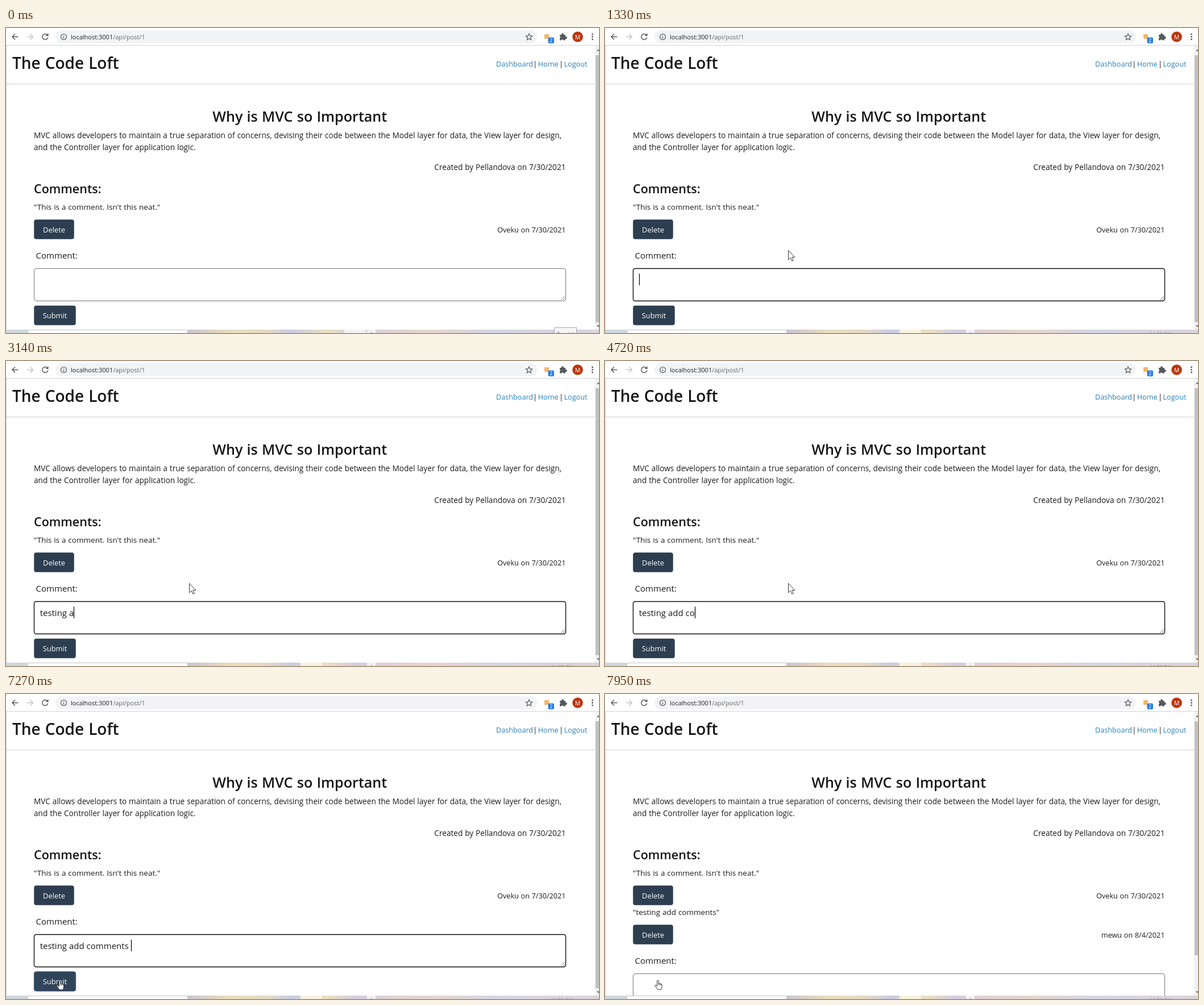
Recreate the animation shown at these times as an HTML page. Size 1043 by 537 pixels, loop 8000 ms.

```html
<!DOCTYPE html>
<html lang="en">
<head>
<meta charset="utf-8">
<title>Blog post comments</title>
<style>
  html, body { margin: 0; width: 100%; height: 100%; overflow: hidden; background: #fff; }
  svg { display: block; width: 1043px; height: 537px; }
  text { font-family: "Open Sans", "Noto Sans", sans-serif; font-size: 13.64px; word-spacing: .4px; fill: #1b1b1b; white-space: pre; }
  .head { font-weight: 600; fill: #161616; word-spacing: .7px; }
  .note { font-size: 13.5px; }
  .small { font-size: 12.65px; }
  .nav { font-size: 12.65px; }
  .link { fill: #2980b9; }
  .field { font-size: 15px; word-spacing: 0; }
  .label { font-size: 12.85px; fill: #fff; }
  .url { font-size: 11px; fill: #202124; }
  .tiny { font-size: 9px; fill: #666; }
  .end { text-anchor: end; }
  .mid { text-anchor: middle; }
  .icon { fill: none; stroke: #55595e; stroke-width: 1.5; }
  .thin { stroke-width: 1.2; }
  .ptr { fill: #fff; stroke: #222; stroke-width: .9; stroke-linejoin: round; }
</style>
</head>
<body>
<svg viewBox="0 0 1043 537">
  <defs>
    <clipPath id="view"><rect y="31" width="1043" height="500"/></clipPath>
    <linearGradient id="wall">
      <stop offset="0" stop-color="#c9c5d0"/>
      <stop offset=".1" stop-color="#eadcbc"/>
      <stop offset=".19" stop-color="#e6dac3"/>
      <stop offset=".25" stop-color="#c9cbe2"/>
      <stop offset=".34" stop-color="#ecdfbe"/>
      <stop offset=".41" stop-color="#d3cde0"/>
      <stop offset=".5" stop-color="#e3d2d2"/>
      <stop offset=".6" stop-color="#e6d6cf"/>
      <stop offset=".75" stop-color="#d4d5e3"/>
      <stop offset="1" stop-color="#dcd3da"/>
    </linearGradient>
  </defs>
  <rect width="1043" height="537" fill="#fff"/>

  <g id="page" clip-path="url(#view)">
    <path d="M0 98.5H1036" stroke="#d2d2d2"/>
    <text class="head" x="11" y="72" style="font-size:28px">The Code Loft</text>
    <text class="nav link" x="862" y="68">Dashboard</text>
    <text class="nav mid" x="930.8" y="68">|</text>
    <text class="nav link" x="935.8" y="68">Home</text>
    <text class="nav mid" x="976.5" y="68">|</text>
    <text class="nav link" x="981.5" y="68">Logout</text>

    <text class="head mid" x="516.7" y="165" style="font-size:25.1px">Why is MVC so Important</text>
    <text x="49" y="194">MVC allows developers to maintain a true separation of concerns, devising their code between the Model layer for data, the View layer for design,</text>
    <text x="49" y="215">and the Controller layer for application logic.</text>
    <text class="end" x="984.5" y="250">Created by Pellandova on 7/30/2021</text>
    <text class="head" x="49" y="291" style="font-size:21.5px">Comments:</text>

    <text class="note" x="49" y="319.5">"This is a comment. Isn't this neat."</text>
    <g id="del"></g>
    <text class="small end" x="984.5" y="360">Oveku on 7/30/2021</text>

    <g id="added">
      <text class="note" x="49" y="388.5">"testing add comments"</text>
      <g id="del2"></g>
      <text class="small end" x="984.5" y="429">mewu on 8/4/2021</text>
    </g>

    <g id="form">
      <text class="field" x="52.5" y="406">Comment:</text>
      <rect id="box" x="49.5" y="423.5" width="935" height="57" rx="3.5" fill="#fff"/>
      <path d="M976 479l7-7M980 479l3-3" stroke="#777" stroke-width=".9"/>
      <text id="typed" class="field" x="59.7" y="449"></text>
      <path id="caret" d="M.5 432.5V453" stroke="#000" stroke-width="1.2"/>
      <g id="send"></g>
    </g>
    <rect x="1036" y="31" width="7" height="500" fill="#f1f1f1"/>
    <rect id="thumb" x="1037" y="48" width="6" fill="#c1c1c1"/>
    <path d="M1039 40.5l3-3 3 3zM1039 523.5l3 3 3-3z" fill="#606060"/>
  </g>
  <path d="M0 30.5H1043M.5 30V531" stroke="#d0d2d5"/>

  <g id="toolbar">
    <rect x="87" y="4" width="847" height="23" rx="11.5" fill="#f1f3f4"/>
    <path class="icon" d="M21.5 15.5H11.5M16 10.5l-5 5 5 5"/>
    <path class="icon" d="M37 15.5H47M42.5 10.5l5 5-5 5" style="stroke:#c3c5c8"/>
    <path id="reload" class="icon" d="M73 12.5A5 5 0 1 0 73.8 16.5M73.8 9.8V13.3H70.2"/>
    <path id="stop" class="icon" d="M64 10.5l10 10M74 10.5l-10 10"/>
    <circle class="icon thin" cx="101.5" cy="15.5" r="5"/>
    <path class="icon thin" d="M101.5 14.8V18.5M101.5 12.3V13.6"/>
    <text class="url" x="114" y="19.5">localhost:3001<tspan fill="#666a6f">/api/post/1</tspan></text>
    <path class="icon thin" d="M920 10l1.6 3.7 4 .4-3 2.7.9 4-3.5-2.1-3.5 2.1.9-4-3-2.7 4-.4z"/>
    <rect x="947" y="11" width="8" height="8" fill="#f3b567"/>
    <rect x="953.5" y="16.5" width="10.5" height="10.5" rx="2" fill="#2b7de1"/>
    <text class="mid" x="958.7" y="24.8" style="font-size:8.5px;fill:#fff">2</text>
    <path d="M974 12h3.2a2 2 0 1 1 3.6 0H984v3.2a2 2 0 1 1 0 3.6V21.5H980.5a2 2 0 0 0-3.6 0H974V18a2 2 0 0 0 0-3.6z" fill="#55595e"/>
    <circle cx="1005.5" cy="15.5" r="9.3" fill="#b9350d"/>
    <text class="mid" x="1005.5" y="19.5" style="font-size:10.5px;fill:#fff">M</text>
    <g fill="#55595e">
      <circle cx="1031.5" cy="11" r="1.4"/>
      <circle cx="1031.5" cy="15.5" r="1.4"/>
      <circle cx="1031.5" cy="20" r="1.4"/>
    </g>
  </g>

  <g id="taskbar">
    <rect y="531" width="38" height="6" fill="#cfd7dc"/>
    <rect x="320" y="531" width="723" height="6" fill="url(#wall)"/>
    <rect x="38" y="531" width="282" height="6" fill="#fff"/>
    <path d="M38.5 537V531.5H319.5V537" fill="none" stroke="#c4c5c8"/>
    <rect id="active" y="531" width="38" height="6"/>
    <rect x="635" y="531" width="15" height="6" fill="#f3f1f5"/>
    <circle cx="642.5" cy="537" r="1.2" fill="#777"/>
    <text class="tiny" x="958" y="542.5">11:38 PM</text>
    <g id="tip">
      <rect x="964.5" y="527.5" width="39" height="14" fill="#f7f5f7" stroke="#a9a7aa"/>
      <text class="tiny" x="969" y="542">To add</text>
    </g>
  </g>

  <g id="cursor">
    <path id="arrow" class="ptr" d="M.5.5V17l3.8-3.6 2.4 5.8 2.6-1.1-2.4-5.6h5z"/>
    <path id="beam" d="M-3-8q3 0 3 1.5q0-1.5 3-1.5M0-7V7M-3 8q3 0 3-1.5q0 1.5 3 1.5" fill="none" stroke="#111"/>
    <g id="hand">
      <path class="ptr" d="M-1.3 1.2q1.3-1.8 2.6 0v4.6l4.6 1.2q1.4.5 1.3 2v3l-1.3 4.8h-6.2l-4.4-6q-.8-1.8 1-2l2.4 2z"/>
      <path d="M1.3 6v3M3.4 6.6v2.6M5.4 7.2v2.2" stroke="#222" stroke-width=".8"/>
    </g>
  </g>
</svg>
<script>
const $ = id => document.getElementById(id);
const LOOP = 8000, FOCUS = 1130, PRESS = 7480, WAIT = 7550, DONE = 7680;
const message = 'testing add comments ';
// time of each keystroke
const keys = [1790, 1860, 2120, 2390, 2520, 2740, 2880, 3010, 3140, 3470, 3670,
  3800, 4590, 4720, 4990, 5120, 5260, 5360, 5450, 5650, 5790];
// pointer stops: time, x, y
const path = [[0, 985, 560], [70, 985, 560], [670, 176, 352], [870, 176, 352],
  [1000, 98, 350], [1130, 150, 440], [1330, 322, 391], [6650, 322, 391],
  [7220, 94.5, 504], [LOOP, 94.5, 504]];

function button(id, y, w, label) {
  $(id).innerHTML =
    `<rect class="ring" x="47.5" y="${y - 1.5}" width="${w + 3}" height="38" rx="5" fill="none" stroke="#5b86c4" stroke-width="3"/>
     <rect class="face" x="49.25" y="${y + .25}" width="${w - .5}" height="34.5" rx="4"/>
     <text class="label mid" x="${49 + w / 2}" y="${y + 22.8}">${label}</text>`;
}
button('del', 337, 71, 'Delete');
button('del2', 406, 71, 'Delete');
button('send', 488.5, 74, 'Submit');

function paint(id, hover, ring) {
  const face = $(id).querySelector('.face');
  face.setAttribute('fill', hover ? '#30445a' : '#2c3e50');
  face.setAttribute('stroke', hover ? '#2b4a80' : 'none');
  face.setAttribute('stroke-width', .6);
  $(id).querySelector('.ring').setAttribute('opacity', ring ? .5 : 0);
}

const show = (id, on) => $(id).setAttribute('visibility', on ? 'inherit' : 'hidden');
const ease = p => p * p * (3 - 2 * p);

function pointer(t) {
  if (t >= 7950) return [93, 503.5];
  let i = path.length - 2;
  while (path[i][0] > t) i--;
  const [t0, x0, y0] = path[i], [t1, x1, y1] = path[i + 1];
  // the screen refreshes about fifteen times a second
  const p = ease(Math.min(1, Math.floor((t - t0) / 66 + 1e-6) * 66 / (t1 - t0)));
  return [x0 + (x1 - x0) * p, y0 + (y1 - y0) * p];
}

const inside = (x, y, l, t, r, b) => x > l && x < r && y > t && y < b;

function draw(t) {
  const done = t >= DONE, focused = t >= FOCUS && t < PRESS;
  const [x, y] = pointer(t);
  const onDel = inside(x, y, 49, 337, 120, 372);
  const onSend = !done && inside(x, y, 49, 488, 123, 524);
  const onBox = !done && inside(x, y, 49, 423, 985, 481);

  const count = keys.filter(k => k <= t).length;
  $('typed').textContent = done ? '' : message.slice(0, count);
  const last = count ? keys[count - 1] : FOCUS;
  show('caret', focused && (t - last) % 1060 < 530);
  const width = count && !done ? $('typed').getComputedTextLength() : 0;
  $('caret').setAttribute('transform', `translate(${Math.round(59.7 + width)} 0)`);

  $('box').setAttribute('stroke', focused ? '#101010' : '#767676');
  $('box').setAttribute('stroke-width', focused ? 1.4 : 1);
  paint('del', onDel, false);
  paint('del2', false, false);
  paint('send', onSend, t >= PRESS && !done);

  show('added', done);
  $('form').setAttribute('transform', `translate(0 ${done ? 69 : 0})`);
  $('thumb').setAttribute('height', done ? 412 : 470);
  const loading = t >= WAIT && !done;
  show('stop', loading);
  show('reload', !loading);

  show('tip', t < 200);
  $('tip').setAttribute('opacity', t < 70 ? 1 : t < 137 ? .5 : .2);
  $('active').setAttribute('x', t < FOCUS ? 595 : 518);
  $('active').setAttribute('fill', t < FOCUS ? '#f4f2f4' : '#f8f2df');

  $('cursor').setAttribute('transform', `translate(${x} ${y})`);
  const hand = onDel || onSend || done;
  show('hand', hand);
  show('beam', onBox);
  show('arrow', !hand && !onBox);
}

const start = performance.now();
function frame() {
  draw((performance.now() - start) % LOOP);
  requestAnimationFrame(frame);
}
draw(0);
requestAnimationFrame(frame);
</script>
</body>
</html>
```
